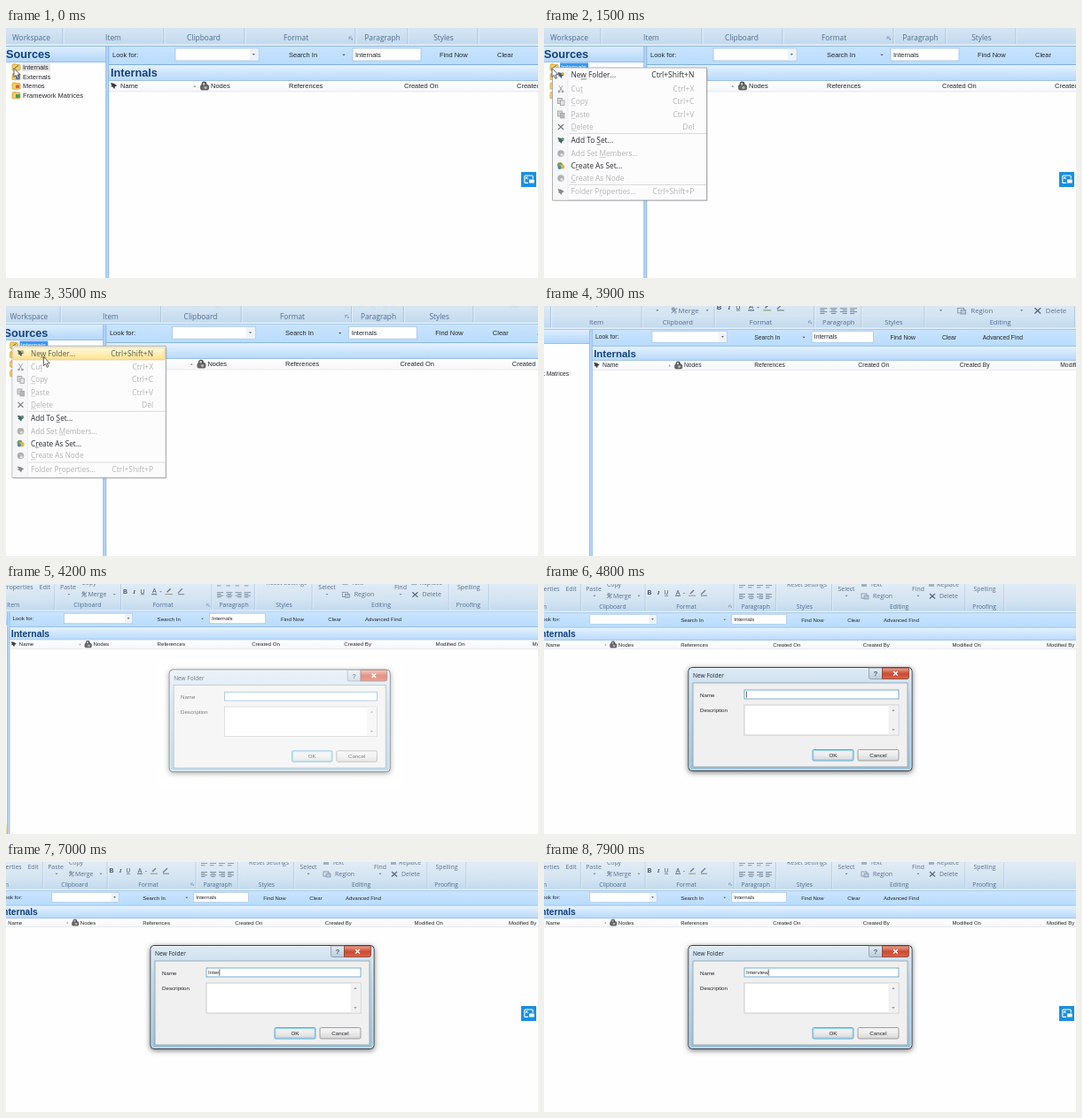
Animation, 600 px wide and 283 px high, one loop 8000 ms. Source, as an HTML page with a canvas:

```html
<!DOCTYPE html>
<html lang="en">
<head>
<meta charset="utf-8">
<title>New folder</title>
<style>
  html, body { margin: 0; width: 100%; height: 100%; overflow: hidden; background: #fefefe; }
  canvas { display: block; width: 600px; height: 283px; }
</style>
</head>
<body>
<canvas id="stage"></canvas>
<script>
const LOOP = 8000, STEP = 100, W = 600, H = 283;
const SANS = '"Liberation Sans", Arial, sans-serif';
const UI = '"Open Sans", "Noto Sans", sans-serif';
const PAPER = '#fefefe', NAVY = '#12407a', INK = '#22262c', GREY = '#b4b4b4';
const TIME = { menu: 800, pipOff: 2500, move: 2300, moved: 2900, zoom: 3400, zoomLen: 1005,
               close: 3900, dialog: 4100, dialogLen: 250, pipOn: 5900, type: 5890, key: 220 };

const canvas = document.getElementById('stage');
const c = canvas.getContext('2d');
const dpr = window.devicePixelRatio || 1;
canvas.width = W * dpr;
canvas.height = H * dpr;

const clamp = (v) => Math.max(0, Math.min(1, v));
const ease = (p) => (1 - Math.cos(Math.PI * clamp(p))) / 2;

function rect(x, y, w, h, fill, stroke, lw = 0.8) {
  if (fill) { c.fillStyle = fill; c.fillRect(x, y, w, h); }
  if (stroke) { c.strokeStyle = stroke; c.lineWidth = lw; c.strokeRect(x, y, w, h); }
}
function rounded(x, y, w, h, r, fill, stroke, lw = 0.8) {
  c.beginPath();
  c.roundRect(x, y, w, h, r);
  if (fill) { c.fillStyle = fill; c.fill(); }
  if (stroke) { c.strokeStyle = stroke; c.lineWidth = lw; c.stroke(); }
}
function line(color, lw, ...pts) {
  c.beginPath();
  for (let i = 0; i < pts.length; i += 2) c.lineTo(pts[i], pts[i + 1]);
  c.strokeStyle = color;
  c.lineWidth = lw;
  c.stroke();
}
function poly(fill, ...pts) {
  c.beginPath();
  for (let i = 0; i < pts.length; i += 2) c.lineTo(pts[i], pts[i + 1]);
  c.closePath();
  c.fillStyle = fill;
  c.fill();
}
function dot(x, y, r, fill) {
  c.beginPath();
  c.arc(x, y, r, 0, 7);
  c.fillStyle = fill;
  c.fill();
}
function shade(y0, y1, ...colors) {
  const g = c.createLinearGradient(0, y0, 0, y1);
  colors.forEach((col, i) => g.addColorStop(i / (colors.length - 1), col));
  return g;
}
function text(s, x, y, size = 7.5, color = INK, font = SANS, align = 'left', weight = '') {
  c.font = `${weight} ${size}px ${font}`;
  c.textAlign = align;
  c.fillStyle = color;
  c.fillText(s, x, y + size * 0.35);
}
const down = (x, y, r = 1.7, col = '#444') => poly(col, x - r, y - r / 2, x + r, y - r / 2, x, y + r / 2);
const up = (x, y, r = 1.7, col = '#888') => poly(col, x - r, y + r / 2, x + r, y + r / 2, x, y - r / 2);

// Coordinates of the zoomed-out view, expressed inside the unzoomed scene.
function settled(draw) {
  c.save();
  c.scale(1.25, 1.25);
  c.translate(101, -16);
  draw();
  c.restore();
}

function ribbonTools() {
  const label = (s, x, y, align = 'center') => text(s, x, y, 6.9, '#5b7291', UI, align);
  const col = '#5b7291';
  [['Properties', 1], ['Edit', 30.5], ['Paste', 56], ['Select', 341], ['Find', 422], ['Spelling', 497]]
    .forEach(([s, x]) => label(s, x, 5.5));
  [['Copy', 71], ['Reset Settings', 274], ['Text', 368], ['Replace', 443]]
    .forEach(([s, x]) => label(s, x, 0.5, 'left'));
  [['Merge', 78], ['Region', 371], ['Delete', 446]].forEach(([s, x]) => label(s, x, 13.5, 'left'));
  [57, 341, 422, 107].forEach((x) => down(x, 13.5, 1.4, col));
  dot(73, 12, 1.9, '#8fa2b8');
  dot(75, 15, 1.7, '#a9b7c8');
  line(col, 0.8, 71, 16, 77, 11);
  text('B', 119, 10, 6.8, '#3f536d', SANS, 'center', 'bold');
  text('I', 129, 10, 6.8, '#3f536d', '"Liberation Serif", serif', 'center', 'italic bold');
  text('U', 138, 10, 6.6, '#3f536d', SANS, 'center');
  line('#3f536d', 0.6, 136, 13.4, 140, 13.4);
  text('A', 151, 9.5, 6.8, '#3f536d', SANS, 'center');
  rect(148, 12.6, 6, 1.3, '#777f8c');
  down(158, 10.5, 1.2, col);
  line('#6d7f96', 1.5, 165, 11, 169, 7);
  rect(163, 12.6, 8, 1.3, '#a8a88c');
  line('#6d7f96', 1.2, 177, 12, 182, 7);
  rect(177, 12.6, 7, 1.3, '#8e99a8');
  for (let g = 0; g < 4; g++)
    for (let k = 0; k < 4; k++) {
      const x = 220 + g * 10, w = k % 2 ? 4.5 : 7;
      rect(x + (7 - w) * (g % 3) / 2, 11 + k * 1.7, w, 0.8, '#6f8199');
      if (k < 2) rect(x, 1 + k * 2.4, w, 0.9, '#8394aa');
    }
  rect(358, 11, 6, 5, '#dfe8f2', '#6f8199', 0.7);
  rect(361, 13, 5, 4, '#b9c9dc', '#6f8199', 0.6);
  rect(358, 0, 6, 3, '#9fb0c4');
  rect(434, 0, 6, 3, '#9fb0c4');
  line('#53657d', 1.1, 435, 11, 441, 16.5);
  line('#53657d', 1.1, 441, 11, 435, 16.5);
}

function ribbon(reveal) {
  rect(0, -40, 1000, 60, shade(-22, 20, '#e2ecf6', '#d7e5f2', '#c3daed'));
  rect(0, 2, 1000, 16.5, shade(2, 18, '#d5e5f3', '#c3daee'));
  [['Workspace', 28.5], ['Item', 121], ['Clipboard', 223], ['Format', 327], ['Paragraph', 424.5],
   ['Styles', 493.5], ['Editing', 627], ['Proofing', 747]]
    .forEach(([s, x]) => text(s, x, 11.5, 8.4, '#516d92', UI, 'center'));
  [64, 178, 269, 394, 453, 532, 720, 775].forEach((x) => {
    line('#9db9d8', 0.8, x, -30, x, 18);
    line('#edf4fb', 0.8, x + 1, -30, x + 1, 18);
  });
  line('#6d88aa', 0.7, 387, 13, 387, 10, 390, 10);
  line('#6d88aa', 0.7, 388, 11, 390.5, 13.5, 390.5, 11.5);
  c.globalAlpha = reveal;
  settled(ribbonTools);
  c.globalAlpha = 1;
  rect(0, 18.5, 1000, 2, '#e9f3fd');
  rect(0, 20, 1000, 1, '#8fb6e4');
}

function pin(x, y, col = '#3c3c3c') {
  poly(col, x - 3.6, y - 3.6, x, y - 2.8, x + 3.8, y - 0.6, x + 1.4, y + 1, x + 0.8, y + 3.6, x - 1.8, y + 0.8);
  line(col, 0.9, x, y, x - 3, y + 0.6);
}

function folderIcon(x, y, kind) {
  rounded(x - 5, y - 3, 9, 6.8, 1, '#f4cf62', '#b88f2d', 0.6);
  rect(x - 4.5, y - 4.2, 4, 2, '#e9bd49');
  if (kind === 0) line('#6b6340', 1, x - 2, y + 1, x + 2, y - 2);
  if (kind === 1) rect(x - 1, y - 1.5, 4.5, 4.5, '#5f7f9e');
  if (kind === 2) rect(x - 1, y - 1, 4, 3.6, '#d9652f');
  if (kind === 3) rect(x - 1, y - 1, 4.6, 4, '#4f9a56');
}

function navPanel(selected) {
  rect(0, 21, 113, 17.5, shade(21, 38, '#deeeff', '#c8e2fc', '#b4d7fa'));
  rect(0, 38, 113, 0.8, '#8ab4e6');
  text('Sources', 0, 30, 12.7, NAVY, SANS, 'left', 'bold');
  ['Internals', 'Externals', 'Memos', 'Framework Matrices'].forEach((s, i) => {
    const y = 44.3 + i * 10.6;
    folderIcon(12, y, i);
    if (!i) rect(18, y - 4.8, 32, 9.6, selected ? '#3a97f2' : '#e6e6e6');
    text(s, 19, y, 7.5, !i && selected ? '#fff' : INK);
  });
  rect(0, 314, 112, 30, shade(314, 335, '#ffe3a0', '#f5b04c'));
  rect(112.5, 21, 3.5, 400, '#b9d8fa');
  rect(112.5, 21, 0.8, 400, '#7faee0');
  rect(115.4, 21, 0.8, 400, '#7faee0');
}

function listView() {
  rect(116, 21, 900, 21, shade(21, 42, '#c8e3fe', '#b9dcfe'));
  text('Look for:', 120, 30);
  rect(191, 23, 94, 14, '#fff', '#a3c2e6');
  rect(274.5, 23.8, 9.8, 12.4, '#edf3fa');
  down(279.3, 30);
  text('Search In', 319, 30.5);
  down(381, 30.5);
  rect(391, 23, 77, 14, '#fff', '#a3c2e6');
  text('Internals', 394, 30);
  text('Find Now', 489, 30.5);
  text('Clear', 554, 30.5);
  text('Advanced Find', 605, 30.5);
  rect(116, 41, 900, 1, '#7faee0');
  rect(116, 42, 900, 17.5, shade(42, 59, '#e4f2ff', '#cfe6fd', '#b8dafb'));
  text('Internals', 118, 51, 12.7, NAVY, SANS, 'left', 'bold');
  rect(116, 59, 900, 0.8, '#8ab4e6');
  rect(116, 60, 900, 12, shade(60, 72, '#fff', '#f5f6f8'));
  rect(116, 71.6, 900, 0.7, '#dfe2e6');
  pin(121.5, 65.5);
  poly('#9a9a9a', 211.5, 67, 214.2, 67, 212.8, 64.5);
  dot(223.5, 63.5, 2.9, '#4c4c4c');
  rounded(219.5, 64.5, 9, 5.5, 1.5, '#6a6a6a', '#3f3f3f', 0.7);
  dot(223.2, 63.4, 1.4, '#c4c4c4');
  dot(225, 67.5, 1.6, '#b5b5b5');
  [['Name', 129], ['Nodes', 231], ['References', 319], ['Created On', 449], ['Created By', 576],
   ['Modified On', 702], ['Modified By', 835]].forEach(([s, x]) => text(s, x, 65.7));
}

// label, shortcut, row centre, enabled, underlined letter index
const ITEMS = [
  ['New Folder...', 'Ctrl+Shift+N', 53.5, 1, 2], ['Cut', 'Ctrl+X', 69.2, 0, 2],
  ['Copy', 'Ctrl+C', 83.5, 0, 0], ['Paste', 'Ctrl+V', 98, 0, 0],
  ['Delete', 'Del', 112, 0, 0], ['Add To Set...', '', 127.5, 1, 7],
  ['Add Set Members...', '', 142, 0, 8], ['Create As Set...', '', 156, 1, 1],
  ['Create As Node', '', 170, 0, 0], ['Folder Properties...', 'Ctrl+Shift+P', 185.5, 0, 8]
];

function menuIcon(i, y) {
  const x = 19, g = '#a2a2a2';
  if (i === 0 || i === 5) {
    pin(x, y, '#3f5f74');
    dot(x + 2, y - 2, 1.6, i ? '#5fa04a' : '#e0a63a');
  } else if (i === 1) {
    line(g, 0.9, x - 2, y - 4, x + 1.4, y + 2);
    line(g, 0.9, x + 2, y - 4, x - 1.4, y + 2);
    dot(x - 2, y + 2.8, 1.4, g);
    dot(x + 2, y + 2.8, 1.4, g);
  } else if (i === 2 || i === 3) {
    rect(x - 3.5, y - 4, 5, 6, '#d4d4d4', g);
    rect(x - 0.5, y - 1.5, 4.5, 5.5, i === 2 ? '#e4e4e4' : '#b9b9b9', g);
  } else if (i === 4) {
    line('#777', 1.1, x - 3, y - 3, x + 3, y + 3);
    line('#777', 1.1, x + 3, y - 3, x - 3, y + 3);
  } else if (i === 7) {
    dot(x - 1, y - 1, 3, '#7aa35a');
    dot(x + 1.6, y + 1, 2.6, '#e2b24a');
    dot(x - 1.5, y + 2, 2, '#4d86b5');
  } else if (i === 9) {
    pin(x, y, '#8a8a8a');
  } else {
    dot(x, y, 3.8, '#b0b0b0');
    dot(x + 1, y + 1.4, 1.7, '#dedede');
  }
}

function menu(hot) {
  rect(11, 47, 173.7, 149, 'rgba(0,0,0,.16)');
  rect(9.5, 45, 174, 150, '#fcfcfc', '#9a9fa6');
  rect(10, 45.5, 17, 149, '#f6f7f8');
  line('#e6e8ea', 0.7, 27, 46, 27, 194.5);
  if (hot) rounded(10.5, 46.8, 172, 14, 1.5, shade(46, 61, '#fffae2', '#ffeeb8', '#ffe08c'), '#e8c97c');
  [119.5, 177.5].forEach((y) => line('#d0d2d5', 0.8, 28, y, 183, y));
  ITEMS.forEach(([s, key, y, on, u], i) => {
    const col = on ? (i || !hot ? '#2a2e34' : '#54604f') : GREY;
    menuIcon(i, y);
    text(s, 30.6, y, 8.3, col, UI);
    const x0 = 30.6 + c.measureText(s.slice(0, u)).width;
    line(col, 0.6, x0, y + 4.4, x0 + c.measureText(s[u]).width, y + 4.4);
    if (key) text(key, 169.3, y, 8.5, col, UI, 'right');
  });
}

function cursor(x, y) {
  c.save();
  c.translate(x, y);
  c.beginPath();
  [[0, 0], [0, 10], [2.3, 8], [4, 11.8], [5.6, 11], [4, 7.4], [7, 7.2]].forEach((p) => c.lineTo(...p));
  c.closePath();
  c.fillStyle = '#fff';
  c.strokeStyle = '#333';
  c.lineWidth = 0.8;
  c.fill();
  c.stroke();
  c.restore();
}

function button(s, x, main) {
  rounded(x, 187.5, 46, 12.5, 1.5, shade(187, 200, '#f6f6f6', '#ececec', '#d6d6d6'),
    main ? '#3c8fc0' : '#8b8b8b', 0.8);
  if (main) rounded(x + 0.9, 188.4, 44.2, 10.7, 1, null, '#7fd0f3', 0.9);
  text(s, x + 23, 194, 6.2, INK, SANS, 'center');
}

function dialog(p, typed) {
  const k = 0.91 + 0.09 * p;
  c.save();
  c.translate(289, 153);
  c.scale(k, k);
  c.translate(-289, -153);
  c.shadowColor = 'rgba(0,0,0,.6)';
  c.shadowBlur = 6 * dpr;
  c.shadowOffsetY = 1.5 * dpr;
  rounded(163, 94.5, 252, 117, 4, '#bcd3e6');
  c.shadowColor = 'transparent';
  rounded(163, 94.5, 252, 117, 4, shade(94, 212, '#dfebf5', '#bdd5e8', '#aecde0', '#9dc4da'), '#38454f', 1);
  rounded(164, 95.5, 250, 115, 3, null, 'rgba(255,255,255,.7)', 0.8);
  text('New Folder', 168, 104, 6.6, '#1d2329', UI);

  rounded(366.5, 95, 15, 12.5, [0, 0, 0, 2], shade(95, 108, '#e4edf5', '#b9cbdb'), '#7b8d9d', 0.7);
  text('?', 374, 101.3, 8, '#50606e', SANS, 'center', 'bold');
  rounded(381.5, 95, 30, 12.5, [0, 0, 2, 0], shade(95, 108, '#e9a795', '#cf4a32', '#d9674c'), '#7d3326', 0.7);
  line('#fff', 1.4, 394.2, 99, 398.8, 103.6);
  line('#fff', 1.4, 398.8, 99, 394.2, 103.6);

  rect(168, 112, 242, 95, '#f0f0f0', '#7e909d', 0.7);
  text('Name', 176, 125.5, 6.2);
  text('Description', 176, 143, 6.2);
  rect(226, 120, 174, 10, '#fff', '#5a9bc6', 0.8);
  text(typed, 228, 125.2, 6.2);
  const end = 228.4 + c.measureText(typed).width;
  if (p === 1) line('#222', 0.7, end, 121.5, end, 128.7);
  rect(226, 137, 174, 34, '#fff', '#b3b8bd', 0.7);
  rect(388.5, 137.5, 11, 33, '#f1f1f1');
  up(394, 142.8);
  down(394, 165.2, 1.7, '#888');
  button('OK', 303, true);
  button('Cancel', 354, false);

  // The window fades in over blank paper, so a thinning veil does the job.
  c.globalAlpha = 1 - p;
  rect(150, 82, 278, 146, PAPER);
  c.restore();
}

function pipBadge() {
  rect(581, 163, 17, 17, '#1b8fe0');
  rounded(584.8, 167, 9.4, 8.4, 1, null, '#fff', 1.1);
  rect(589, 170.6, 7, 5.6, '#1b8fe0');
  rounded(590, 171.6, 5.6, 4, 0.6, '#fff');
  line('#fff', 0.9, 586.6, 171, 586.6, 169, 588.6, 169);
  line('#fff', 0.9, 586.8, 169.2, 589, 171.2);
}

function render(t) {
  const zoom = ease((t - TIME.zoom) / TIME.zoomLen);
  const scale = 1 - 0.2 * zoom;
  c.setTransform(dpr, 0, 0, dpr, 0, 0);
  rect(0, 0, W, H, PAPER);

  c.save();
  c.translate(-101 * zoom, 16 * zoom);
  c.scale(scale, scale);
  ribbon(clamp(zoom * 4));
  listView();
  navPanel(t >= TIME.menu);
  const move = ease((t - TIME.move) / (TIME.moved - TIME.move));
  if (t >= TIME.menu && t < TIME.close) menu(move > 0.3);
  cursor(9 + 36 * move, 45.5 + 12 * move);
  if (t >= TIME.dialog) {
    const count = Math.max(0, Math.floor((t - TIME.type) / TIME.key));
    const open = clamp((t - TIME.dialog + 50) / TIME.dialogLen);
    settled(() => dialog(open, 'Interview'.slice(0, count)));
  }
  c.restore();

  if (t < TIME.pipOff || t >= TIME.pipOn) pipBadge();
}

const start = performance.now();
function tick() {
  const t = (performance.now() - start) % LOOP;
  render(Math.floor(t / STEP) * STEP);
  requestAnimationFrame(tick);
}
tick();
</script>
</body>
</html>
```
